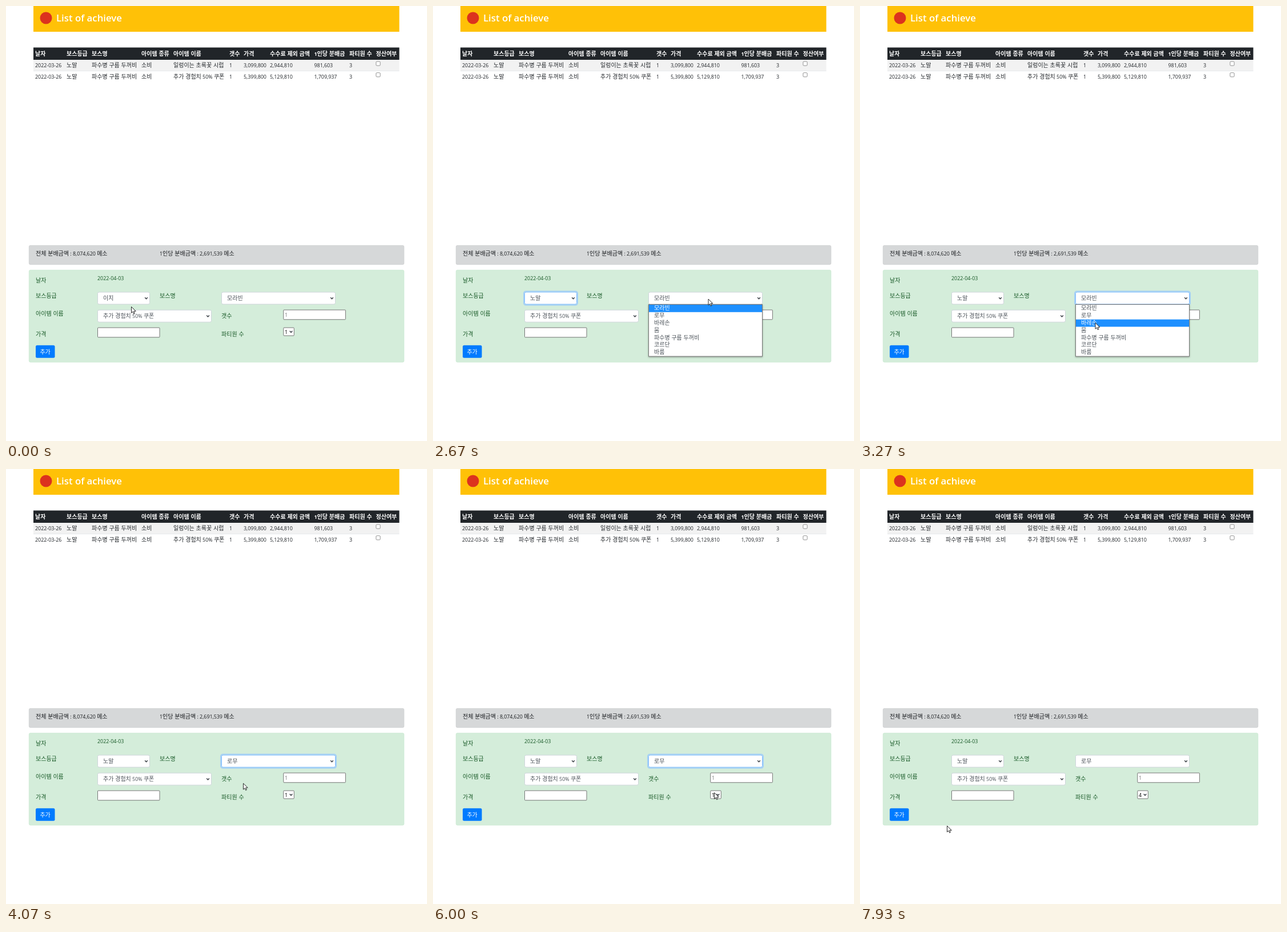
Write an HTML page that moves like this. It is 737 by 760 pixels and loops after 8 s.

```html
<!DOCTYPE html>
<html lang="ko">
<head>
<meta charset="utf-8">
<title>List of achieve</title>
<style>
  html, body { margin: 0; width: 100%; height: 100%; overflow: hidden; background: #fff; }
  svg { display: block; width: 100vw; height: 100vh; }
  text { font: 8.9px 'Open Sans', 'Noto Sans', sans-serif; white-space: pre; }
  .ko { font-family: 'Noto Sans CJK KR', 'Noto Sans CJK', sans-serif; font-size: 10px; }
  .bold { font-weight: 700; }
  .title { font-size: 16.8px; font-weight: 600; }
</style>
</head>
<body>
<svg id="stage" viewBox="0 0 737 760"></svg>
<script>
const LOOP = 8000, TICK = 200 / 3, ROW = 12.8;
const INK = '#212529', GREEN = '#155724', FIELD = '#495057', EDGE = '#767676';
const stage = document.getElementById('stage');

function add(tag, attrs, parent = stage) {
  const el = document.createElementNS('http://www.w3.org/2000/svg', tag);
  for (const key in attrs) el.setAttribute(key, attrs[key]);
  parent.append(el);
  return el;
}

function box(x, y, right, bottom, fill, stroke = 'none', rx = 0, parent = stage) {
  return add('rect', { x, y, width: right - x, height: bottom - y, fill, stroke, rx }, parent);
}

// Hangul runs get their own font and size.
function setText(el, str) {
  if (el.dataset.value === str) return;
  el.dataset.value = str;
  el.replaceChildren();
  for (const part of str.split(/([가-힣]+(?: [가-힣]+)*)/)) {
    if (!part) continue;
    const span = add('tspan', /[가-힣]/.test(part) ? { class: 'ko' } : {}, el);
    span.textContent = part;
  }
}

function label(x, y, str, fill = INK, cls = '', parent = stage) {
  const el = add('text', { x, y, fill, class: cls }, parent);
  setText(el, str);
  return el;
}

function show(el, on) { el.style.display = on ? '' : 'none'; }

function chevron(x, y) {
  add('path', { d: `M${x - 2.3} ${y - 1.2}l2.3 2.4l2.3 -2.4`, fill: 'none', stroke: '#343a40', 'stroke-width': 1.4 });
}

function select(x, y, right, value) {
  const ring = box(x - 1, y - 1, right + 1, y + 23, 'none', '#a5d0f5', 3.5);
  ring.setAttribute('stroke-width', 2);
  const frame = box(x + .5, y + .5, right - .5, y + 21.5, '#fff', '#ced4da', 2.5);
  const text = label(x + 10, y + 14.6, value, FIELD);
  chevron(right - 6.5, y + 11);
  return {
    text,
    focus(on) {
      show(ring, on);
      frame.setAttribute('stroke', on ? '#80bdff' : '#ced4da');
    }
  };
}

function menu(x, y, right, textX, options, color) {
  const bottom = y + 1 + ROW * options.length;
  const group = add('g', {});
  group.style.filter = 'drop-shadow(0 1.5px 1.5px rgba(0,0,0,.35))';
  box(x + .5, y + .5, right - .5, bottom + .5, '#fff', EDGE, 0, group);
  const bar = box(x + 1, y + 1, right - 1, y + 1 + ROW, '#1e90ff', 'none', 0, group);
  const items = options.map((str, i) => label(textX, y + 10.4 + i * ROW, str, color, '', group));
  return (open, pointerY) => {
    show(group, open);
    const row = Math.floor((pointerY - y - .5) / ROW);
    const current = Math.max(0, Math.min(options.length - 1, row));
    bar.setAttribute('y', y + 1 + current * ROW);
    items.forEach((el, i) => el.setAttribute('fill', i === current ? '#fff' : color));
  };
}

// Title bar
box(48, 0, 688.5, 45, '#ffc107');
add('circle', { cx: 70, cy: 21, r: 10.5, fill: '#dc321e' });
label(88, 27, 'List of achieve', '#fff', 'title');

// Table
const columns = [51, 106, 150, 237, 293, 391, 416, 462, 539.5, 601, 647.5];
const cells = (y, words, fill, cls) => words.forEach((word, i) => label(columns[i], y, word, fill, cls));
box(48, 72.5, 688.5, 94, INK);
cells(86.6, ['날자', '보스등급', '보스명', '아이템 종류', '아이템 이름', '갯수', '가격',
  '수수료 제외 금액', '1인당 분배금', '파티원 수', '정산여부'], '#fff', 'bold');
box(48, 94, 688.5, 113.5, '#f2f2f2');
box(48, 113, 688.5, 113.7, '#dee2e6');
const record = ['2022-03-26', '노말', '파수병 구름 두꺼비', '소비'];
cells(107.4, [...record, '일렁이는 초록꽃 시럽', '1', '3,099,800', '2,944,810', '981,603', '3']);
cells(127, [...record, '추가 경험치 50% 쿠폰', '1', '5,399,800', '5,129,810', '1,709,937', '3']);
for (const y of [97, 116.6]) box(647.9, y, 655.1, y + 7.2, '#fff', EDGE, 1.4).setAttribute('stroke-width', .8);

// Totals
box(40.3, 418.3, 696.8, 451.7, '#d6d8d9', '#c6c8ca', 2.5).setAttribute('stroke-width', .6);
label(52, 436.4, '전체 분배금액 : 8,074,620 메소', '#1b1e21');
label(269, 436.4, '1인당 분배금액 : 2,691,539 메소', '#1b1e21');

// Form
box(40.3, 461.3, 696.8, 622.3, '#d4edda', '#c3e6cb', 2.5).setAttribute('stroke-width', .6);
[[52, 482.8, '날자'], [160, 479.2, '2022-04-03'], [52, 510, '보스등급'], [269, 510, '보스명'],
  [52, 541.4, '아이템 이름'], [377, 545.4, '갯수'], [52, 576.6, '가격'], [377, 576.6, '파티원 수']]
  .forEach(([x, y, str]) => label(x, y, str, GREEN));

const grade = select(160, 499.5, 252, '이지');
const boss = select(377, 499.5, 577, '모라빈');
select(160, 530.7, 360, '추가 경험치 50% 쿠폰').focus(false);

box(485.8, 531, 594.4, 547.8, '#fff', EDGE, 1);
label(488, 543, '1', '#757575');
const spinner = add('g', {});
box(584, 532.5, 593, 546.5, '#efefef', 'none', 0, spinner);
add('path', { d: 'M586.5 537.5l2-2.5l2 2.5zM586.5 541.5l2 2.5l2 -2.5z', fill: '#505050' }, spinner);

box(160.5, 562, 269, 578.8, '#fff', EDGE, 1);
box(485.8, 562, 504.3, 576, '#fff', EDGE, 1.2);
const party = label(488, 572.6, '1', '#000');
chevron(499, 569);

box(52, 592.8, 85.5, 614.8, '#007bff', 'none', 2.5);
label(59.4, 607.7, '추가', '#fff');

const gradeMenu = menu(160, 521, 251.7, 170, ['이지', '노말', '하드', '카오스'], FIELD);
const bossMenu = menu(377, 521, 577, 387,
  ['모라빈', '로무', '바레손', '뭄', '파수병 구름 두꺼비', '코르단', '바룸'], FIELD);
const partyMenu = menu(485.3, 576, 504.8, 488, ['1', '2', '3', '4', '5', '6'], INK);

// Pointer
const arrow = add('path', {
  d: 'M.5 .5V11.2L3 8.9L4.7 12.6L6.4 11.8L4.8 8.2H8.3Z',
  fill: '#fff', stroke: '#111', 'stroke-width': .9, 'stroke-linejoin': 'round'
});
const beam = add('path', {
  d: 'M-2 -4.5H-.6L0 -4L.6 -4.5H2M0 -4V4M-2 4.5H-.6L0 4L.6 4.5H2',
  fill: 'none', stroke: '#222', 'stroke-width': .9
});

// time, x, y
const path = [
  [0, 219, 525], [330, 222, 500], [730, 222, 500], [1270, 210, 527],
  [2329, 210, 527], [2330, 481, 517], [2469, 481, 517], [2470, 481.5, 511.5],
  [2670, 481.5, 511.5], [3270, 411.5, 553], [3400, 495, 548], [3530, 495, 548],
  [3670, 495, 545], [3930, 495, 545], [4270, 278, 555], [4470, 278, 555],
  [5200, 394, 541], [5330, 523, 547], [5470, 510.5, 547], [5670, 510.5, 547],
  [6000, 492, 565], [6330, 492, 565], [6870, 487, 618], [7000, 487, 618],
  [7070, 488, 620], [7270, 488, 620], [7670, 339, 621], [7800, 339, 621],
  [7930, 152, 623], [LOOP, 152, 623]
];

function pointerAt(t) {
  const i = path.findIndex(key => key[0] > t);
  const [t0, x0, y0] = path[i - 1], [t1, x1, y1] = path[i];
  const u = (t - t0) / (t1 - t0), ease = u * u * (3 - 2 * u);
  return [x0 + (x1 - x0) * ease, y0 + (y1 - y0) * ease];
}

function draw(time) {
  const tick = Math.floor((time + 5) / TICK);
  const t = Math.round(tick * TICK / 10) * 10 % LOOP;
  const within = (from, to) => t >= from && t < to;
  const [x, y] = pointerAt(t);
  const menus = [within(730, 2330), within(2670, 4000), within(6330, 7270)];

  setText(grade.text, t < 2330 ? '이지' : '노말');
  setText(boss.text, t < 4000 ? '모라빈' : '로무');
  setText(party, t < 7270 ? '1' : '4');
  grade.focus(within(730, 2740));
  boss.focus(within(2740, 6330));
  [gradeMenu, bossMenu, partyMenu].forEach((update, i) => update(menus[i], y));

  const typing = !menus.includes(true) && x > 485 && x < 595 && y > 530 && y < 548;
  show(spinner, typing);
  show(beam, typing);
  show(arrow, !typing);
  (typing ? beam : arrow).setAttribute('transform', `translate(${x} ${y})`);
}

const start = performance.now();
function frame() {
  draw((performance.now() - start) % LOOP);
  requestAnimationFrame(frame);
}
frame();
</script>
</body>
</html>
```
